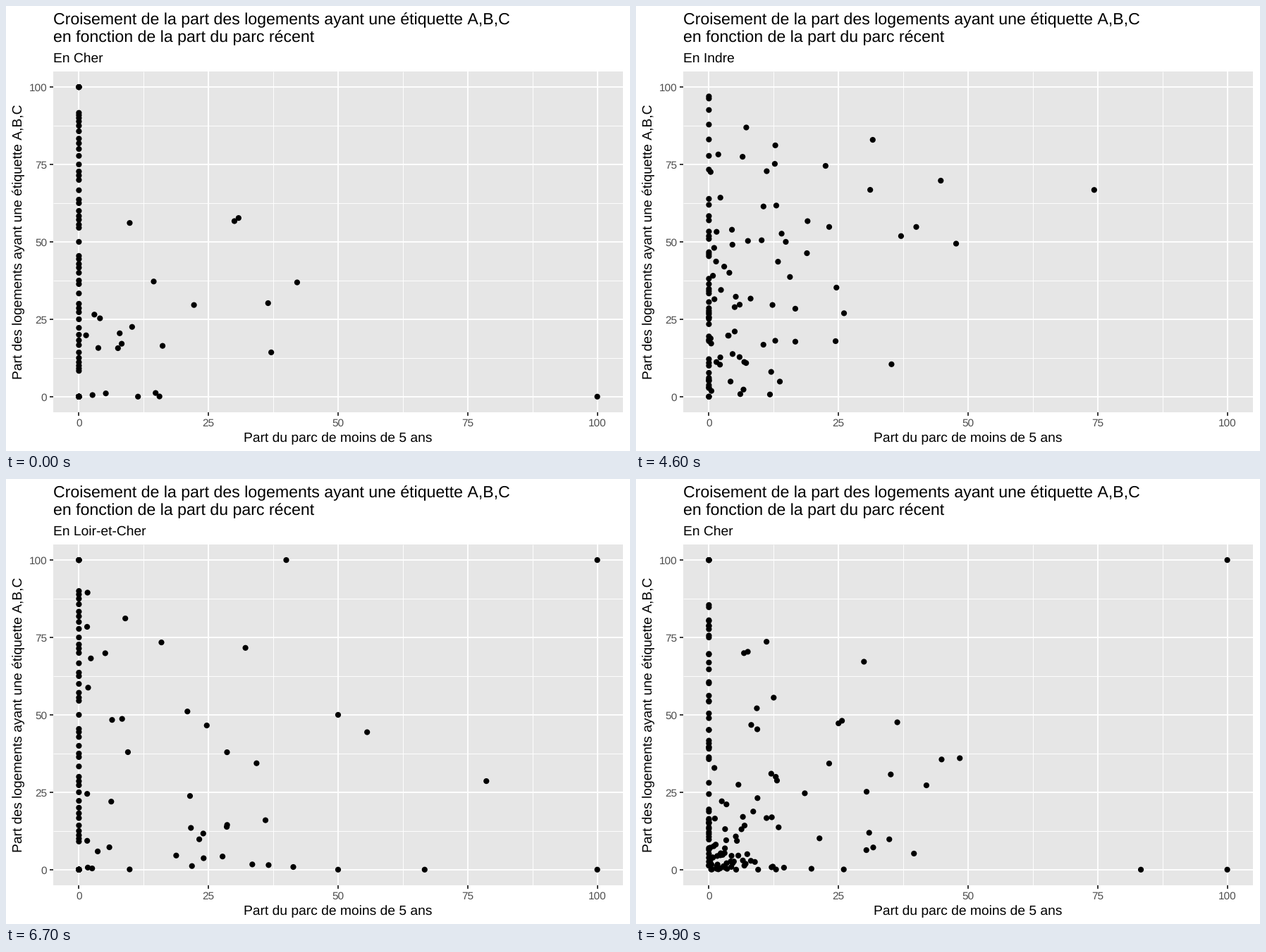
Recreate the animation shown at these times as a matplotlib script. Size 885 px wide and 632 px high, loop 10 s.

```python
from math import gcd

import numpy as np
import matplotlib.pyplot as plt
from matplotlib.animation import FuncAnimation
from matplotlib.patches import Rectangle

plt.rcParams["font.family"] = "Liberation Sans"
plt.rcParams["text.hinting"] = "none"

W, H, DPI = 885, 632, 100
FRAMES, STEP_MS, STEPS = 100, 100, 6
STARTS = [11, 28, 45, 62, 79, 95]
NAMES = ["Cher", "Eure-et-Loir", "Indre", "Indre-et-Loire", "Loir-et-Cher", "Loiret"]
rng = np.random.default_rng(18)


def column(n):
    """Shares of small towns: the n simplest fractions, at x = 0."""
    shares = [100 * p / q for q in range(2, 16) for p in range(1, q) if gcd(p, q) == 1]
    return [(0, y) for y in shares[:n]]


def cloud(n, reach, height):
    """Random towns, denser towards the lower left."""
    u = rng.random((n, 2)) ** 1.8
    return [(1 + reach * x, height * y) for x, y in u]


def rows(*parts):
    """Stack the parts after the repeated rows at 100 %."""
    return np.array([(0, 100)] * 6 + sum(parts, []), float)


def mixed(*parts):
    return rng.permutation(rows(*parts, zeros(30)))


def zeros(n):
    return [(0, 0)] * n


cher = rows(
    [(30, 56.7), (30.8, 57.7), (42.1, 36.9), (36.5, 30.2), (37.1, 14.3), (22.2, 29.6),
     (9.8, 56.1), (100, 0)],
    cloud(15, 16, 46), column(45), zeros(50))
eure = mixed(
    [(100, 100), (100, 0), (76.7, 40), (55.3, 78.9), (50, 80), (42.1, 57.9), (34.9, 78),
     (16.3, 93)],
    cloud(36, 34, 80), column(34))
indre = mixed(
    [(100, 100), (42.9, 100), (44.5, 100), (55.6, 77.8), (60, 60), (41, 59),
     (27.8, 81.5), (19.5, 92.6)],
    cloud(24, 37, 66), column(49))
touraine = mixed(
    [(100, 100), (60, 100), (40, 100), (52.2, 91.3), (51, 52.8), (57.1, 42.8),
     (50, 12.5), (44.5, 0)],
    cloud(64, 38, 98), column(55))
blois = mixed(
    [(100, 100), (100, 0), (66.7, 0), (50, 0), (78.6, 28.6), (55.6, 44.4), (50, 50),
     (40, 100)],
    cloud(37, 42, 92), column(40))
# Row order pairs the towns of Loiret with those of Cher; the last ones have no pair.
loiret = rows(
    zeros(24),
    [(78.8, 6), (75, 0), (77.4, 54.9), (66.7, 66.7), (66.7, 0), (56, 72), (55.5, 12.7)],
    column(50), cloud(62, 44, 72),
    [(48.4, 36), (34.8, 9.8), (100, 100), (100, 0)])
STATES = [cher, eure, indre, touraine, blois, loiret]


def px(x):
    return 103.4 + 7.352 * x


def py(y):
    return 554.8 - 4.397 * y


def pt(pixels):
    return pixels * 72 / DPI


fig = plt.figure(figsize=(W / DPI, H / DPI), dpi=DPI, facecolor="white")
ax = fig.add_axes([0, 0, 1, 1])
ax.set_xlim(0, W)
ax.set_ylim(H, 0)
ax.axis("off")

left, right, top, bottom = px(-5), px(105), py(105), py(-5)
ax.add_patch(Rectangle((left, top), right - left, bottom - top, fc="#E6E6E6", lw=0))


def line(xs, ys, width, color="white"):
    ax.plot(xs, ys, color=color, lw=pt(width), solid_capstyle="butt")


def label(x, y, text, size, color="black", **kw):
    return ax.text(x, y, text, fontsize=pt(size), color=color, va="baseline", **kw)


for v in np.arange(12.5, 100, 25):
    line([px(v)] * 2, [top, bottom], 0.95)
    line([left, right], [py(v)] * 2, 0.95)
for v in range(0, 101, 25):
    line([px(v)] * 2, [top, bottom], 1.9)
    line([left, right], [py(v)] * 2, 1.9)
    line([px(v)] * 2, [bottom, bottom + 4.8], 1.9, "#333333")
    line([left - 4.8, left], [py(v)] * 2, 1.9, "#333333")
    label(px(v), 596.7, str(v), 15.4, "#4D4D4D", ha="center")
    label(58, py(v) + 5.7, str(v), 15.4, "#4D4D4D", ha="right")

# The no-break space keeps the full gap before the capital A.
TAG = "ayant une étiquette\u00a0A,B,C"
label(left, 26.3, "Croisement de la part des logements " + TAG, 23.1)
label(left, 51.5, "en fonction de la part du parc récent", 23.1)
label(px(50), 619, "Part du parc de moins de 5 ans", 19.25, ha="center")
label(23.3, py(50), "Part des logements " + TAG, 19.25,
      ha="center", rotation=90, rotation_mode="anchor")
subtitle = label(left, 79.7, "", 19.25)
dots = ax.scatter([], [], c="black", linewidths=0, zorder=5)


def blend(a, b, t):
    """Rows move in pairs; spare rows of a wait, spare rows of b come at the end."""
    if t >= 1:
        return b
    n = min(len(a), len(b))
    return np.vstack([a[:n] + (b[:n] - a[:n]) * t, a[n:]])


def draw(frame):
    now, t = 0, 0
    for i, start in enumerate(STARTS):
        if frame >= start:
            now, t = i, min((frame - start + 1) / STEPS, 1)
    after = (now + 1) % len(STATES)
    towns = blend(STATES[now], STATES[after], t)
    dots.set_offsets(np.column_stack([px(towns[:, 0]), py(towns[:, 1])]))
    # One size per dot keeps sub-pixel positions.
    dots.set_sizes(np.full(len(towns), pt(8.2) ** 2))
    subtitle.set_text("En " + NAMES[after if t >= 0.5 else now])
    return dots, subtitle


anim = FuncAnimation(fig, draw, frames=FRAMES, interval=STEP_MS, repeat=True,
                     repeat_delay=0, init_func=lambda: draw(0))
plt.show()
```
